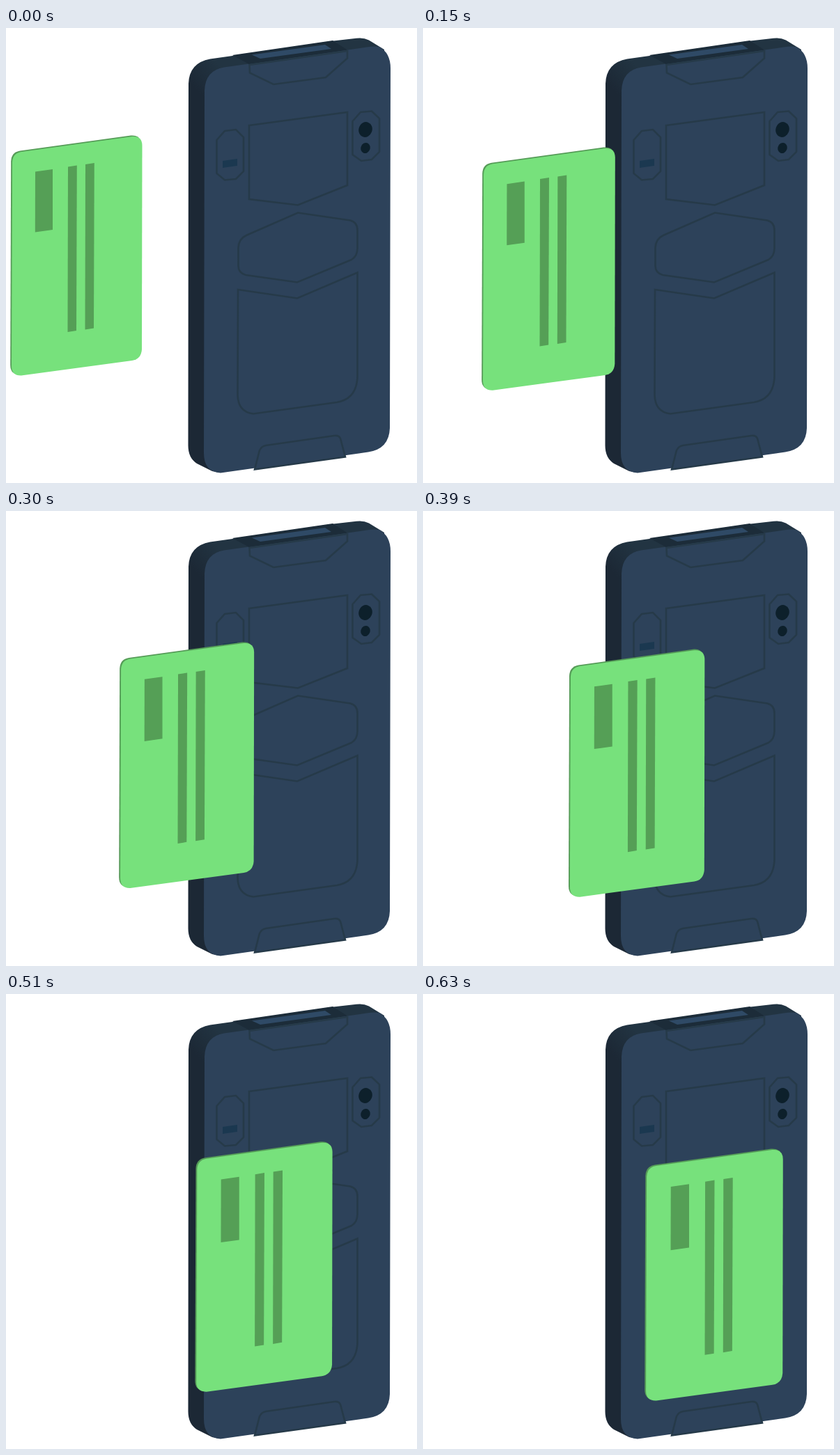
Animation of 590 by 654 pixels, one loop 1.13 s. Source, as an HTML page:

```html
<!DOCTYPE html>
<html lang="en">
<head>
<meta charset="utf-8">
<title>Card and handheld</title>
<style>
  html, body { margin: 0; width: 100%; height: 100%; overflow: hidden; background: #fff; }
  svg { display: block; width: 100vw; height: 100vh; }
  .line { fill: none; stroke: #263a49; stroke-width: 2.6; }
  .face { fill: #2d425a; }
  .lens { fill: #0d202b; }
  .edge { fill: #559b57; }
  .front { fill: #77e17c; }
  .mark { fill: #559f56; }
</style>
</head>
<body>
<svg viewBox="0 0 590 654" preserveAspectRatio="none">
  <defs>
    <linearGradient id="rim" gradientUnits="userSpaceOnUse" x1="266" y1="80" x2="302" y2="48">
      <stop offset="0" stop-color="#1c2835"/>
      <stop offset="1" stop-color="#223442"/>
    </linearGradient>
    <path id="plate" d="M9 193 Q9.5 180 22 178 L181 156 Q195.500 155 195.500 169 L195 462 Q194 476 181 478 L22 499.500 Q8 500 8 486 Z"/>
  </defs>

  <g id="phone">
    <path fill="url(#rim)" d="M262 80 Q263 50 293 44.500 L325 40 L470 18.500 L503 14.700 Q513 13.500 521 17.500 L543 31 L540 60 L310 90 L308 639 L296 637 L274 626 Q261.500 618 261.500 600 Z"/>
    <path class="face" d="M285 90 Q286 61 313 56.500 L518 27.500 Q528 26 536 27 Q552 36 552 58 L551 575 Q550 605 520 609.500 L308 639.500 Q284 638 284 611 Z"/>
    <path fill="#1c2c39" d="M325 39 L469 18 L490 31.500 L349 52 Z"/>
    <path fill="#2f4a66" d="M353 38.500 L458 24 L467 30 L365 44 Z"/>
    <path class="line" d="M349.500 53 L490 33 V43.500 L459 71 L384 81 L350 64.500 Z"/>
    <path class="line" d="M302.500 161 L314 148 L330 146 L341 157 V206 L330 217 L314 218.500 L302.500 209 Z"/>
    <path class="line" d="M497.500 134 L509 121 L525 119.500 L536 130 V178 L525 189 L510 191 L497.500 182 Z"/>
    <path fill="#1b3850" d="M311 191 L332 188 V198 L311 201 Z"/>
    <ellipse class="lens" cx="516" cy="146" rx="9.600" ry="11" transform="rotate(20 516 146)"/>
    <ellipse class="lens" cx="516" cy="172.500" rx="6.600" ry="7.600" transform="rotate(20 516 172.500)"/>
    <path class="line" d="M349 140 L490 121 V226 L419 254.500 L349 246 Z"/>
    <path class="line" d="M345 298 L419 265.500 L494 276.500 Q504.500 279 504.500 291 V316 Q504.500 328 496 333 L418 365.500 L344 355 Q333.500 352 333.500 342 V316 Q334 303 345 298 Z"/>
    <path class="line" d="M333 376 L418 388.500 L504.500 351.500 V500 Q504 533 475 538 L355 554.500 Q333 552 332.500 527 Z"/>
    <path class="line" style="fill:#2d425a" d="M357 634.500 L364 607 Q367 601 373 600 L471 586 Q478 585 480 590 L487 616.500 Z"/>
  </g>

  <g id="card">
    <use href="#plate" class="edge" x="-1.800" y="-1.500"/>
    <use href="#plate" class="front"/>
    <path class="mark" d="M42 206.500 L67 203 V290 L41.800 293.500 Z"/>
    <path class="mark" d="M89 199.500 L101.800 197.500 L101 435 L88.500 437 Z"/>
    <path class="mark" d="M114 196 L126.800 194 L126 431.500 L113.500 433.500 Z"/>
  </g>
</svg>
<script>
  const LOOP = 1130, STEP = 30, STEPS = 20;
  const card = document.getElementById("card");

  // The card slides in and grows slightly, in even steps, then rests.
  function draw(ms) {
    const p = Math.min(Math.floor((ms % LOOP) / STEP), STEPS) / STEPS;
    card.setAttribute("transform",
      `translate(${311.7 * p} ${60.4 * p}) scale(${1 + 0.049 * p})`);
  }

  const start = performance.now();
  function tick() {
    draw(performance.now() - start);
    requestAnimationFrame(tick);
  }
  tick();
</script>
</body>
</html>
```
